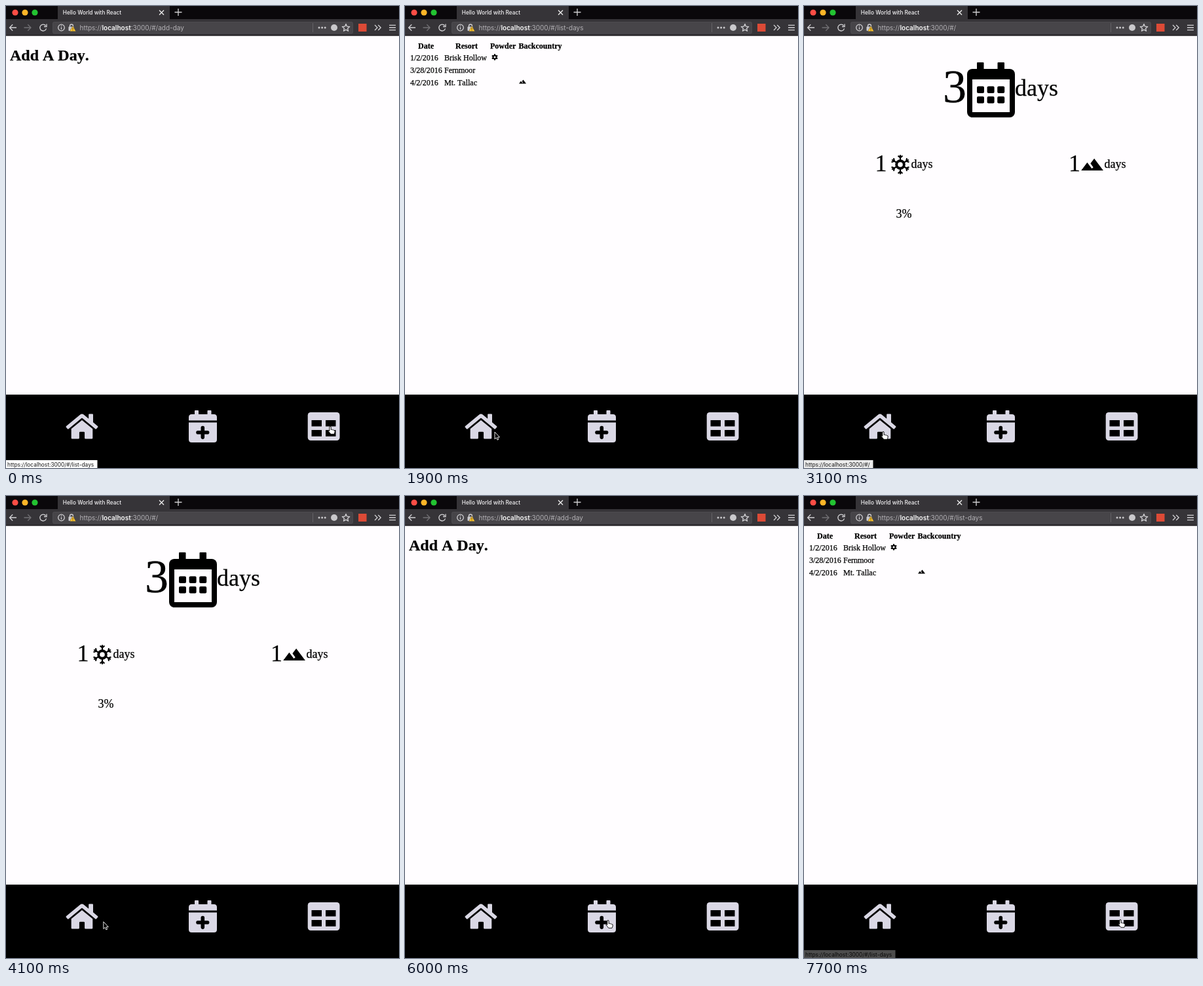
An HTML page for the animation above (7800 ms loop, 600 by 705 pixels).

```html
<!DOCTYPE html>
<html lang="en">
<head>
<meta charset="utf-8">
<title>Day tracker</title>
<style>
  html, body { margin: 0; width: 100%; height: 100%; overflow: hidden; background: #000; }
  svg { display: block; width: 600px; height: 705px; }
  .ui { font-family: Inter, Roboto, sans-serif; }
  .page { font-family: "Liberation Serif", "Noto Serif", serif; font-kerning: none; fill: #000; }
  .page text { stroke: #000; stroke-width: .25; }
  .line { fill: none; stroke: #d2d1d4; stroke-width: 1.3; }
  .cell { font-size: 12px; }
  .bold { font-weight: bold; }
</style>
</head>
<body>
<svg viewBox="0 0 600 705">
  <defs>
    <path id="terrain" d="M14 6l-3.75 5 2.85 3.8-1.6 1.2C9.8 13.75 7 10 7 10l-6 8h22z"/>
    <path id="arm" d="M0-6V-14.8M-3.4-13.6L0-10.4 3.4-13.6" fill="none" stroke="#000" stroke-width="2.1"/>
    <g id="snow"><circle r="5.8" fill="none" stroke="#000" stroke-width="4"/></g>
  </defs>

  <!-- browser chrome -->
  <g class="ui">
    <rect width="600" height="46" fill="#0a080b"/>
    <path d="M79 0H250V20H600V44.6H0V20H79Z" fill="#363438"/>
    <circle cx="14" cy="10" r="4.6" fill="#fd4d45"/>
    <circle cx="29" cy="10" r="4.6" fill="#fdb527"/>
    <circle cx="44" cy="10" r="4.6" fill="#22c331"/>
    <text x="86.8" y="13" font-size="8.25" font-weight="500" fill="#f4f3f5">Hello World with React</text>
    <g class="line">
      <path d="M234 6.5l7 7m0-7l-7 7" stroke="#eee"/>
      <path d="M257.5 9.5h11M263 4v11"/>
      <path d="M16 33H5.5m4.7-4.7L5.5 33l4.7 4.7"/>
      <path d="M27.5 33H38m-4.7-4.7L38 33l-4.7 4.7" stroke="#727074"/>
      <path d="M60.6 30A4.9 4.9 0 1 0 61.5 34.3M62 27.5v4h-4"/>
    </g>
    <rect x="71.5" y="24.5" width="458" height="17.5" rx="2" fill="#474549" stroke="#545256" stroke-width=".7"/>
    <g class="line">
      <circle cx="84.5" cy="33" r="4.8"/>
      <path d="M84.5 32.3v3.4M84.5 29.8v1.3"/>
      <path d="M97.5 32v-1.5a2.5 2.5 0 0 1 5 0V32"/>
    </g>
    <rect x="95.5" y="31.5" width="8" height="6.5" rx="1" fill="#cbcacd"/>
    <path d="M102 30.5l4.7 8.2h-9.4z" fill="#ffc62b" stroke="#474549" stroke-width=".5"/>
    <path d="M102 33.5v2.5m0 .7v1" stroke="#5b4714"/>
    <text x="112.5" y="37" font-size="10" fill="#b3b1b5">https://<tspan fill="#fafafa" font-weight="600">localhost</tspan>:3000/#/<tspan id="route"></tspan></text>
    <path d="M468.5 26v14" stroke="#646266"/>
    <g fill="#c9c8cb">
      <circle cx="478" cy="33" r="1.5"/><circle cx="482.6" cy="33" r="1.5"/><circle cx="487.2" cy="33" r="1.5"/>
      <circle cx="501" cy="33" r="5"/>
    </g>
    <path id="star" class="line" stroke-linejoin="round"/>
    <rect x="538" y="27" width="12.5" height="12" fill="#dc4a36"/>
    <path class="line" d="M563 29l4 4-4 4m5.2-8l4 4-4 4"/>
    <path class="line" d="M585 29.3h10M585 33h10M585 36.7h10"/>
  </g>

  <rect y="45.6" width="600" height="547.4" fill="#fffdff"/>

  <g id="add-day" class="page">
    <text class="bold" x="6" y="83" font-size="24">Add A Day.</text>
  </g>

  <g id="list-days" class="page cell">
    <g class="bold">
      <text x="20" y="65">Date</text><text x="77" y="65">Resort</text>
      <text x="130" y="65">Powder</text><text x="173.5" y="65">Backcountry</text>
    </g>
    <text x="8" y="83">1/2/2016</text><text x="60" y="83">Brisk Hollow</text>
    <text x="8" y="101.5">3/28/2016</text><text x="60" y="101.5">Fernmoor</text>
    <text x="8" y="120.5">4/2/2016</text><text x="60" y="120.5">Mt. Tallac</text>
    <g transform="translate(137 78)" fill="none" stroke="#000" stroke-width="2">
      <circle r="2.6"/>
      <path d="M0-4.8V-3M0 3V4.8M-4.2-2.4L-2.6-1.5M4.2 2.4L2.6 1.5M4.2-2.4L2.6-1.5M-4.2 2.4L-2.6 1.5"/>
    </g>
    <use href="#terrain" transform="translate(173.5 109.5) scale(.5)"/>
  </g>

  <g id="home" class="page">
    <text x="212" y="146.5" font-size="72">3</text>
    <rect x="249" y="96" width="73" height="74" rx="8"/>
    <path d="M264 87q0-1 1-1h8.5q1 0 1 1V98H264zM295.5 87q0-1 1-1h8.5q1 0 1 1V98H295.5z"/>
    <rect x="257" y="112" width="57" height="50" fill="#fffdff"/>
    <g id="dates"></g>
    <text x="322" y="137" font-size="36">days</text>
    <text x="108.5" y="252" font-size="36">1</text>
    <use href="#snow" transform="translate(147 242)"/>
    <text x="163.5" y="247" font-size="18">days</text>
    <text x="404" y="252" font-size="36">1</text>
    <use href="#terrain" transform="translate(421.7 223.5) scale(1.53)"/>
    <text x="458.5" y="247" font-size="18">days</text>
    <text x="140.5" y="323" font-size="18">3%</text>
  </g>

  <!-- bottom navigation -->
  <rect y="593" width="600" height="112"/>
  <g fill="#dad8e5">
    <g transform="translate(91.5 619.8) scale(.085)">
      <path d="M288 143L96 300V464q0 16 16 16h112q16 0 16-16V368q0-16 16-16h64q16 0 16 16v96q0 16 16 16h112q16 0 16-16V300z"/>
      <path d="M4 252L257 43q31-24 62 0L408 117V44q0-12 12-12h56q12 0 12 12V183L572 252q9 8 1 17l-26 31q-8 8-16 1L296 107q-8-5-16 0L45 301q-9 7-17-1L3 269q-7-9 1-17z"/>
    </g>
    <path d="M279 632.5V627.5q0-4.5 4.5-4.5H288V618q0-1 1-1h4q1 0 1 1V623H307.5V618q0-1 1-1h4q1 0 1 1V623H317.5q4.5 0 4.5 4.5V632.5z"/>
    <path d="M279 635.5H322V661.5q0 4.5-4.5 4.5H283.5q-4.5 0-4.5-4.5z"/>
    <rect x="460.7" y="620" width="48.8" height="43" rx="4.5"/>
  </g>
  <path d="M293 650.8h14.6M300.3 643.5v14.6" stroke="#000" stroke-width="5.6" stroke-linecap="round"/>
  <path d="M466.5 632h15.5v9.5h-15.5zM488 632h15.5v9.5H488zM466.5 647h15.5v9.8h-15.5zM488 647h15.5v9.8H488z"/>

  <g id="status" class="ui">
    <rect id="statusBox" y="693" height="12" fill="#fff"/>
    <text id="statusText" x="2" y="703.2" font-size="8.35" fill="#161616"></text>
  </g>

  <g id="cursor" stroke-linejoin="round" stroke-width=".9">
    <path id="hand" fill="#fff" stroke="#000" d="M-1.2 1Q-1.2-.6 0-.6T1.2 1V4.6Q2.5 3.6 3.4 4.9 4.8 4.2 5.5 5.5 7.3 5.2 7.2 7 7.2 9 6 11.3H.8Q-1 8.6-3 6.8-3.4 5-1.2 6.4Z"/>
    <path id="arrow" fill="#000" stroke="#fff" d="M0 0V10.8L2.5 8.6 4 12.2 5.8 11.4 4.3 8H7.5Z"/>
  </g>
</svg>

<script>
const LOOP = 7800;
const STEP = 100;
const $ = id => document.getElementById(id);

const pages = {
  'add-day': { path: 'add-day', statusWidth: 138.5 },
  'list-days': { path: 'list-days', statusWidth: 139.5 },
  home: { path: '', statusWidth: 105.5 }
};

// Each visit: the link is hovered, then clicked.
const visits = [
  { page: 'list-days', hover: -200, click: 800 },
  { page: 'home', hover: 2200, click: 3100 },
  { page: 'add-day', hover: 4900, click: 5300 },
  { page: 'list-days', hover: 7200, click: 7600 }
];

// Cursor stops: time, x, y
const stops = [
  [0, 495, 642], [1200, 495, 642], [1900, 137, 650], [2000, 125, 651], [2100, 121, 650],
  [3900, 121, 650], [4700, 299, 648], [5900, 299, 648], [6000, 310, 648],
  [6800, 472, 648], [7000, 483, 647], [LOOP, 483, 647]
];
const links = [[92, 136], [279, 322], [461, 509]];

function buildIcons() {
  const add = (parent, markup) => parent.insertAdjacentHTML('beforeend', markup);
  for (let i = 0; i < 6; i++) {
    add($('snow'), `<use href="#arm" transform="rotate(${i * 60})"/>`);
    const x = 264 + (i % 3) * 15.6, y = 122.5 + Math.floor(i / 3) * 15.5;
    add($('dates'), `<rect x="${x}" y="${y}" width="11" height="10.5" rx="2"/>`);
  }
  const points = Array.from({ length: 10 }, (_, i) => {
    const r = i % 2 ? 2.7 : 6, a = i * Math.PI / 5;
    return `${519 + r * Math.sin(a)} ${33.4 - r * Math.cos(a)}`;
  });
  $('star').setAttribute('d', `M${points.join('L')}Z`);
}

function cursorAt(t) {
  const next = Math.max(1, stops.findIndex(s => s[0] >= t));
  const [t0, x0, y0] = stops[next - 1], [t1, x1, y1] = stops[next];
  const p = (t - t0) / (t1 - t0), eased = p * p * (3 - 2 * p);
  return [x0 + (x1 - x0) * eased, y0 + (y1 - y0) * eased];
}

function statusOpacity(t, { hover, click }) {
  if (t < hover || t >= click + 2 * STEP) return 0;
  if (t >= click + STEP) return 0.3;
  return t < hover + STEP || t >= click ? 0.92 : 1;
}

function draw(t) {
  const page = visits.reduce((shown, v) => t >= v.click ? v.page : shown, 'add-day');
  for (const id in pages) $(id).style.display = id === page ? '' : 'none';
  $('route').textContent = pages[page].path;

  const visit = visits.find(v => statusOpacity(t, v) > 0);
  $('status').setAttribute('opacity', visit ? statusOpacity(t, visit) : 0);
  if (visit) {
    const { path, statusWidth } = pages[visit.page];
    $('statusBox').setAttribute('width', statusWidth);
    $('statusText').textContent = 'https://localhost:3000/#/' + path;
  }

  const [x, y] = cursorAt(t);
  const overLink = links.some(([left, right]) => x >= left && x <= right);
  $('cursor').setAttribute('transform', `translate(${x} ${y})`);
  $('hand').style.display = overLink ? '' : 'none';
  $('arrow').style.display = overLink ? 'none' : '';
}

buildIcons();
const start = performance.now();
function tick() {
  const t = (performance.now() - start) % LOOP;
  draw(Math.floor(t / STEP) * STEP);
  requestAnimationFrame(tick);
}
tick();
</script>
</body>
</html>
```
